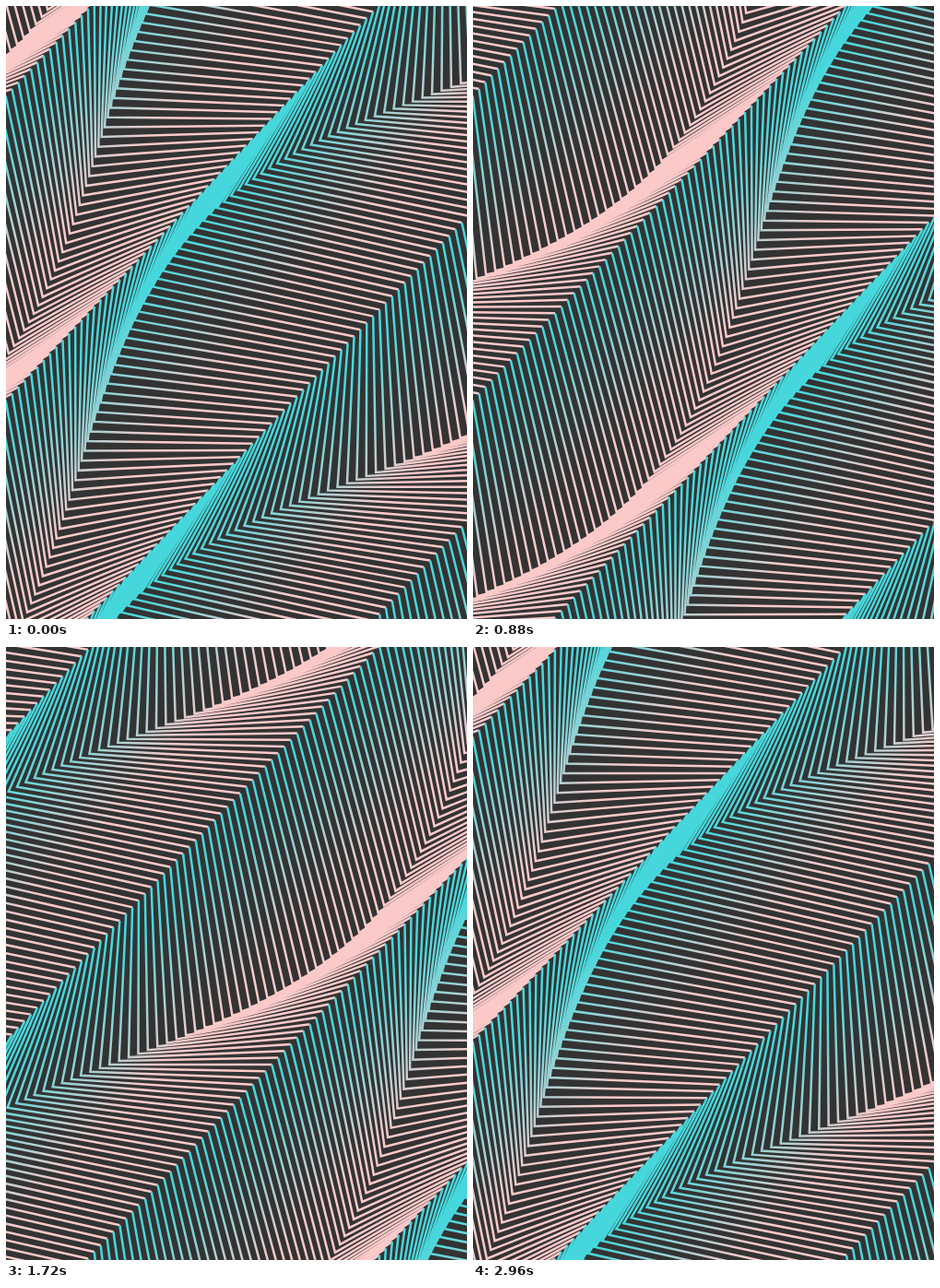
These frames come from a looping animation (500 px wide and 665 px high, 3 s). An HTML page with a canvas:

```html
<!DOCTYPE html>
<html lang="en">
<head>
<meta charset="utf-8">
<title>Chevron waves</title>
<style>
  html, body { margin: 0; width: 100%; height: 100%; overflow: hidden; background: #333; }
  canvas { display: block; }
</style>
</head>
<body>
<canvas id="stage" width="500" height="665"></canvas>
<script>
const ctx = document.getElementById('stage').getContext('2d');

const LOOP = 3000, STEP = 40;
const ANGLE = -46.6 * Math.PI / 180;
const TOP = -160.4;       // upper edge of the first band, in rotated space
const BAND = 227;         // band width
const GAP = 10;           // distance between neighbouring lines
const LAG = 121;          // how far each bend trails behind its ends
const MID = 110, SWING = 88;
const WAVE = 1130;        // wavelength along a band
const CRESTS = [-10, -322, -595, -957, -1262]; // wave crest of each band at time 0

const fills = CRESTS.map((_, i) => {
  const y = TOP + i * BAND;
  const g = ctx.createLinearGradient(0, y, 0, y + BAND);
  g.addColorStop(0.12, '#46d7dc');
  g.addColorStop(0.65, '#fcc9c9');
  return g;
});

function drawBand(i, phase) {
  const y = TOP + i * BAND;
  ctx.beginPath();
  for (let x = -521; x < 520; x += GAP) {
    const bend = x - LAG;
    const depth = MID + SWING * Math.cos(2 * Math.PI * ((bend - CRESTS[i]) / WAVE - phase));
    ctx.moveTo(x, y);
    ctx.lineTo(bend, y + depth);
    ctx.lineTo(x, y + BAND);
  }
  ctx.strokeStyle = fills[i];
  ctx.stroke();
}

function draw() {
  const time = Math.floor(performance.now() % LOOP / STEP) * STEP;
  ctx.setTransform(1, 0, 0, 1, 0, 0);
  ctx.fillStyle = '#333';
  ctx.fillRect(0, 0, 500, 665);
  ctx.rotate(ANGLE);
  ctx.lineWidth = 2.5;
  CRESTS.forEach((_, i) => drawBand(i, time / LOOP));
  requestAnimationFrame(draw);
}
draw();
</script>
</body>
</html>
```
